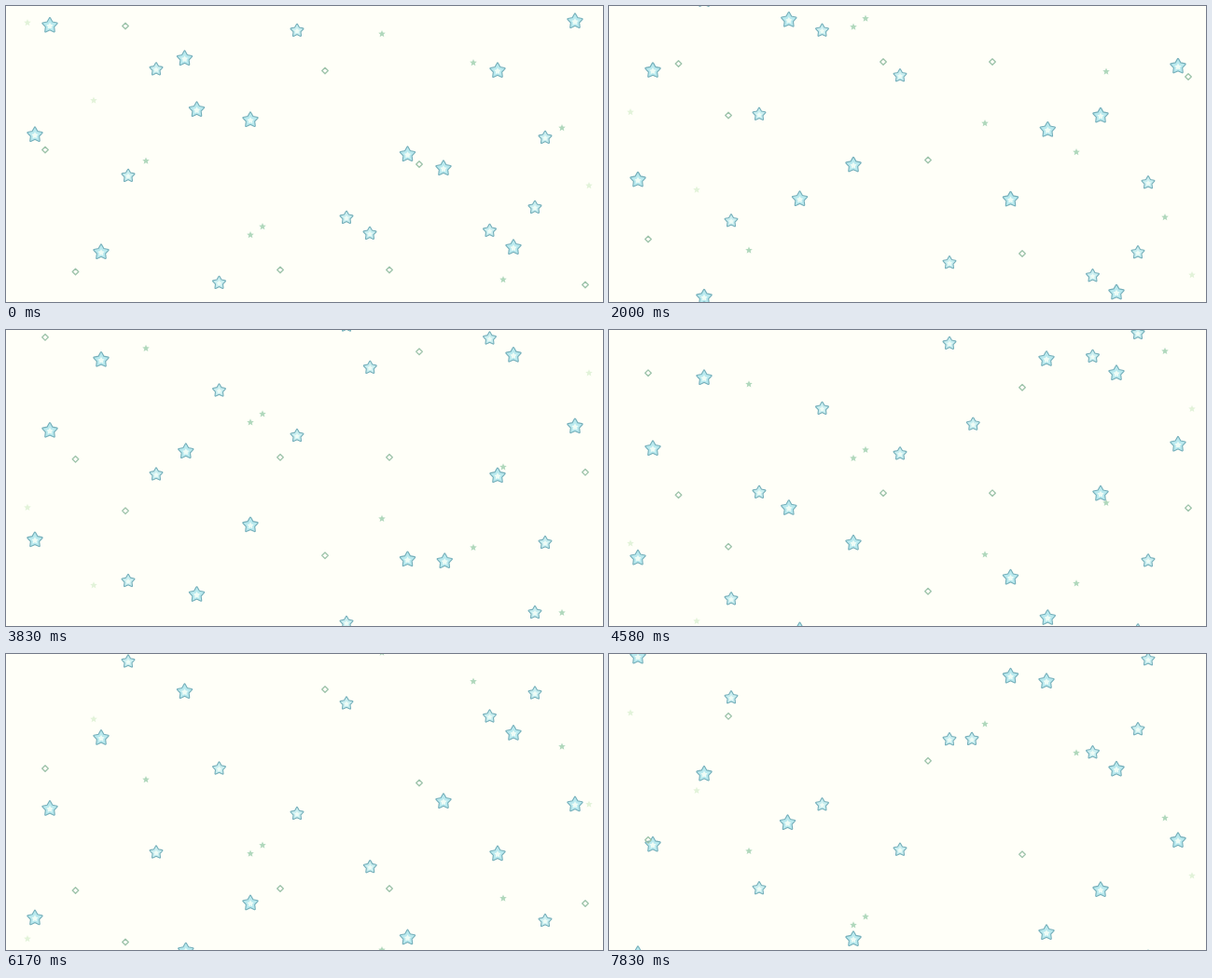
Write an HTML page with a canvas that moves like this. It is 640x318 px and loops after 8000 ms.

```html
<!DOCTYPE html>
<html lang="en">
<head>
<meta charset="utf-8">
<title>Falling stars</title>
<style>
  html, body { margin: 0; width: 100%; height: 100%; overflow: hidden; background: #fffff8; }
  canvas { display: block; width: 640px; height: 318px; }
</style>
</head>
<body>
<canvas id="sky" width="640" height="318"></canvas>
<script>
const ctx = document.getElementById('sky').getContext('2d');
const LOOP = 8000, TICK = 1000 / 12, WRAP = 319.5;
const SLOW = 9.68, QUICK = 19.2;

// Start positions, as [x, y]
const bigStars = [[47, 20.5], [610, 16], [527, 69], [262, 122], [31, 138],
  [102, 264], [430.5, 159], [544, 259]];
const smallStars = [[312, 26], [161, 67.5], [131, 182], [228.5, 297], [365, 227],
  [578, 141], [567, 216], [518.5, 241]];
const diamonds = [[128, 21.5], [342, 69.5], [42, 154.5], [443, 170], [74.5, 285.5],
  [294, 283.5], [411, 283.5], [621, 299.5]];
const sparks = [[403, 30], [501, 61], [596, 131], [150, 166.5], [262, 246],
  [275, 237], [533, 294]];
const faintSparks = [[23, 18], [94, 101.5], [625, 193]];

// A fast trio of stars; each track gives [move, y] keys
const trio = [[389, 0, small], [191.5, 90, big], [469, 208, big]];
const tracks = [
  { dx: 1, keys: [[0, 244], [1, 321]] },
  { dx: 1.3, keys: [[2, -162], [9, 40], [14, 192], [17, 301], [19, 370]] },
  { dx: 0, keys: [[0, -34], [2, 120]] },
  { dx: 0, keys: [[9, -238], [14, -86], [17, 22], [19, 91]] },
  { dx: 0, keys: [[0, -304], [2, -150]] },
  { dx: 0, keys: [[17, -248], [19, -179]] }
];

function starPath(x, y, r, inner) {
  ctx.beginPath();
  for (let i = 0; i < 10; i++) {
    const a = (i / 5 - 0.5) * Math.PI;
    const d = i % 2 ? r * inner : r;
    ctx.lineTo(x + d * Math.cos(a), y + d * Math.sin(a));
  }
  ctx.closePath();
}

function outlinedStar(x, y, r, fill) {
  starPath(x, y + 0.5, r, 0.54);
  ctx.lineJoin = 'round';
  ctx.lineWidth = 2.2;
  ctx.strokeStyle = '#75afba';
  ctx.stroke();
  ctx.fillStyle = fill;
  ctx.fill();
  starPath(x, y + 1, r * 0.48, 0.56);
  ctx.fillStyle = '#effcf6';
  ctx.fill();
}

function big(x, y) { outlinedStar(x, y, 8, '#b9e9ee'); }
function small(x, y) { outlinedStar(x, y, 6.7, '#c9eef0'); }

function diamond(x, y) {
  ctx.beginPath();
  ctx.moveTo(x, y - 3.3);
  ctx.lineTo(x + 3.3, y);
  ctx.lineTo(x, y + 3.3);
  ctx.lineTo(x - 3.3, y);
  ctx.closePath();
  ctx.lineWidth = 1.3;
  ctx.strokeStyle = '#9dc3aa';
  ctx.stroke();
}

function spark(x, y, color = '#b0d8bc') {
  starPath(x, y, 4, 0.45);
  ctx.fillStyle = color;
  ctx.fill();
}

function faintSpark(x, y) { spark(x, y, '#e2f3d9'); }

function drawLooping(list, shift, shape) {
  for (const [x, y0] of list) {
    const y = (y0 + shift) % WRAP;
    shape(x, y);
    if (y > WRAP - 12) shape(x, y - WRAP);
    if (y < 12) shape(x, y + WRAP);
  }
}

// Small pieces come round only once
function drawQuick(list, shift, shape) {
  drawLooping(list.filter(([, y]) => y + shift < 2 * WRAP), shift, shape);
}

function valueAt(keys, m) {
  for (let i = 1; i < keys.length; i++) {
    const [m0, y0] = keys[i - 1], [m1, y1] = keys[i];
    if (m >= m0 && m <= m1) return y0 + (y1 - y0) * (m - m0) / (m1 - m0);
  }
  return null;
}

function draw(move) {
  ctx.fillStyle = '#fffff8';
  ctx.fillRect(0, 0, 640, 318);
  drawQuick(faintSparks, move * QUICK, faintSpark);
  drawQuick(sparks, move * QUICK, spark);
  drawLooping(smallStars, move * SLOW, small);
  drawLooping(bigStars, move * SLOW, big);
  big(204.5, 111 + move * QUICK);
  for (const { dx, keys } of tracks) {
    const y = valueAt(keys, move);
    if (y !== null) for (const [x, dy, shape] of trio) shape(x + dx, y + dy);
  }
  drawQuick(diamonds, move * QUICK, diamond);
}

const start = performance.now();
let shown = -1;
function frame() {
  const t = (performance.now() - start) % LOOP;
  const tick = Math.floor((t + 4) / TICK);
  const move = Math.min(19, Math.floor((tick + 0.5) / 4.8));
  if (move !== shown) draw(shown = move);
  requestAnimationFrame(frame);
}
frame();
</script>
</body>
</html>
```
